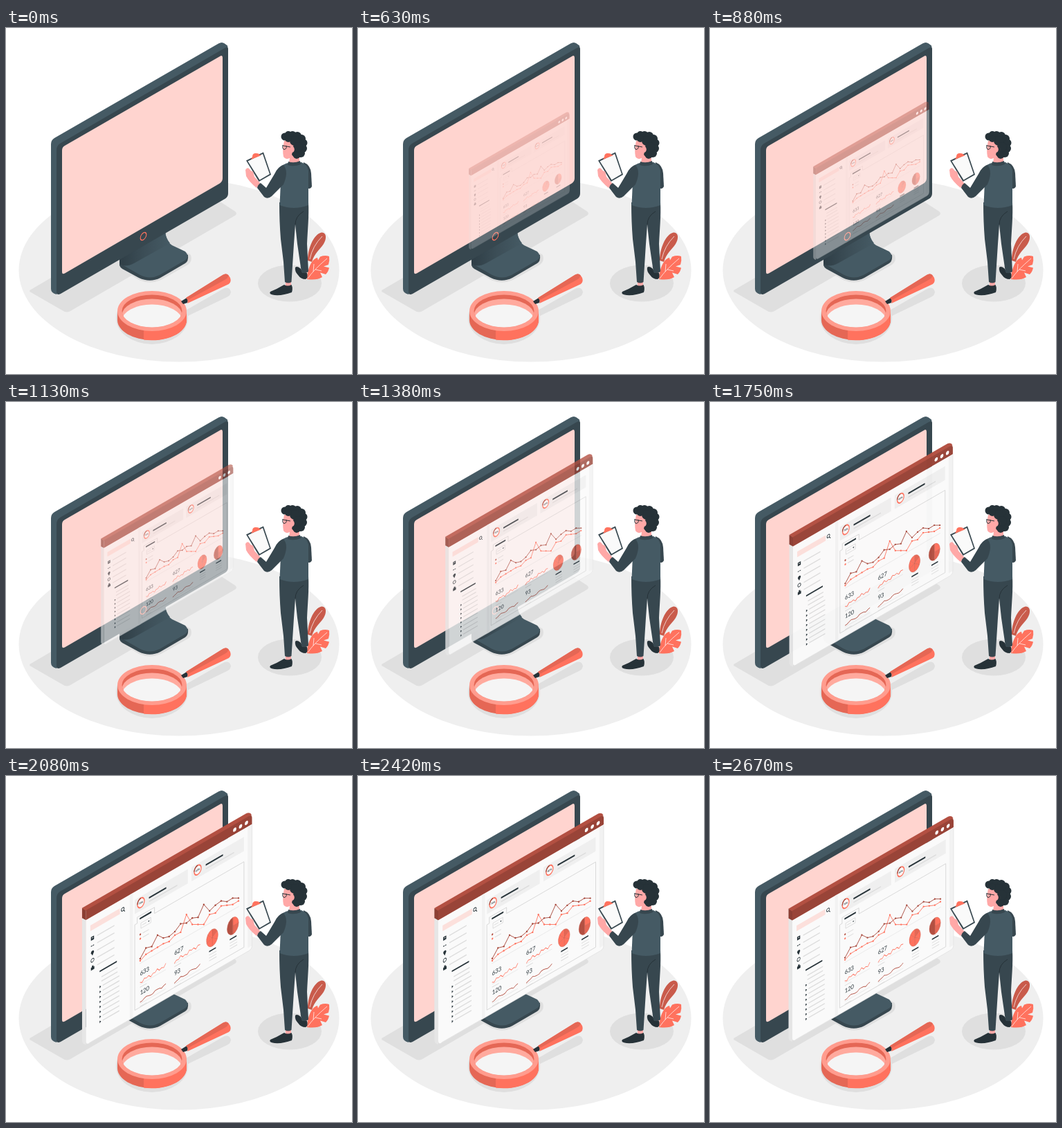
Animation of 500x500 px, one loop 2710 ms. Source, as an HTML page:

```html
<!DOCTYPE html>
<html lang="en">
<head>
<meta charset="utf-8">
<title>Dashboard on a screen</title>
<style>
html, body { margin: 0; width: 100%; height: 100%; overflow: hidden; background: #fff; }
svg { display: block; width: 100vw; height: 100vh; }
text { font-family: Lato, sans-serif; fill: #263238; }
</style>
</head>
<body>
<svg viewBox="0 0 500 500">
  <defs>
    <clipPath id="hole"><ellipse cx="211" cy="409" rx="43.5" ry="23.5"/></clipPath>
    <linearGradient id="neck" x1="0" x2="1"><stop offset="0" stop-color="#2f3e46"/><stop offset=".5" stop-color="#3c4e57"/><stop offset="1" stop-color="#455a64"/></linearGradient>
  </defs>

  <!-- floor and shadows -->
  <ellipse cx="250" cy="350" rx="231.5" ry="132.5" fill="#efefef"/>
  <g fill="#dfdfdf">
    <path d="M36 378L65 361L300 252Q306 249 311 252L331 265Q335 268 331 271L93 409Q88 412 83 409L36 382Q32 380 36 378Z"/>
    <path d="M166 348L192 364Q208 371 224 364L263 342Q270 337 267 328L250 318Z"/>
    <ellipse cx="410" cy="369" rx="46" ry="26.5"/>
    <ellipse cx="211" cy="419" rx="52" ry="38"/>
    <path d="M258 409L312 378Q322 372 325 381Q325 386 319 389L263 416Z"/>
  </g>

  <!-- stand -->
  <path fill="#37474f" d="M164 334V343Q165 346 168 348L192 361Q208 368.500 223 361L259 340Q264 337 263 328L230 312Z"/>
  <path fill="#455a64" d="M166 341L193 356.500Q208 364 222 357L259 335.500Q266 330 259 323L240 314Q231 309 230 294Z"/>
  <path fill="url(#neck)" d="M164 333L230 294Q231 304 237 311L185 340Q174 346 166 342L164 340Z"/>

  <!-- monitor -->
  <path fill="#455a64" d="M65 168Q65 162 70 159L307 22.500Q312 19.500 316 22.500L320 25.500L321 31L73 385Q65 383 65 377Z"/>
  <path fill="#37474f" d="M73 177Q73 170 78 167L316 29Q321 26 321 31V239Q321 244 317 246.500L79 384Q73 387 73 381Z"/>
  <path fill="#ffd4cf" d="M81 177Q81 172 85 170L309 41Q313 38.500 313 43V217Q313 222 309 224.500L85 354.500Q81 357 81 352Z"/>
  <circle r="5" fill="none" stroke="#ff725e" stroke-width="1.300" transform="matrix(.866 -.5 0 1 198.500 301)"/>

  <g id="panel"></g>

  <!-- magnifier -->
  <path fill="#e56755" d="M161 409V422A50 29 0 0 0 261 422V409Z"/>
  <path fill="#ff725e" d="M199 436V450.500A50 29 0 0 0 261 422V409Z"/>
  <ellipse cx="211" cy="409" rx="50" ry="29" fill="#ff9c8e"/>
  <g clip-path="url(#hole)">
    <rect x="160" y="380" width="102" height="60" fill="#e56755"/>
    <ellipse cx="211" cy="415" rx="43.500" ry="23.500" fill="#ffaa9e"/>
    <ellipse cx="211" cy="423" rx="43.500" ry="23.500" fill="#f5f5f5"/>
  </g>
  <path fill="#263238" d="M253 395L261 390Q264 393 262 397L256 399Z"/>
  <path fill="#ff725e" d="M260 390L313 357Q320 353 324 361Q326 367 322 370L262 398Q264 393 260 390Z"/>
  <path fill="#e56755" d="M260 390L313 357Q319 353 322 358Q320 362 316 364L263 393Q262 391 260 390Z"/>

  <!-- plant -->
  <path fill="#c95b4b" d="M436 336C436 320 444 298 456 295.500C463 295 464 304 459 312C453 321 446 325 442 338Z"/>
  <path fill="#ff725e" d="M435 363C436 345 443 333 450 332L451 335.500L454 330.500Q461 328 467 330Q468 336 466 342L459 344.500L467 346.500Q466 352 462 356L454 353.500L457 360Q449 365 435 363Z"/>
  <path fill="none" stroke="#fff" stroke-width=".7" d="M439 334Q443 315 457 301M436 362Q444 350 464 333M444 352L445 341M447 349L456 351"/>

  <!-- person -->
  <g id="person">
    <path fill="#ffa8a7" d="M404 364H412V374H404ZM427 350H435V358H427Z"/>
    <path fill="#263238" d="M382 381Q392 377 402 371Q407 374 412.500 371Q415 376 413 382Q400 387 388 386Q379 385 382 381ZM418 346Q421 343 426 348L429 354L435 354Q437 361 433 363Q426 363 422 357Q417 352 418 346Z"/>
    <path fill="#37474f" d="M395 252H437C438 272 436 290 435 312L437 352Q432 356 427 353L421 312L418 284L416 312L412.500 367Q408 370 403 367L401 338L397 305Q395 280 395 252Z"/>
    <path fill="none" stroke="#263238" d="M418 284Q418 272 430 265"/>
    <path fill="#37474f" d="M430 194Q440 198 441 210L442 229Q440 234 435 231L431 210Z"/>
    <path fill="#455a64" d="M398 199Q405 195 411 194H427Q435 197 437 206L437 256Q416 264 395.500 256Z"/>
    <path fill="#ffa8a7" d="M402 163Q399 177 401 186Q404 191 410 188L409 195H424V163Z"/>
    <path fill="#37474f" d="M408 193Q416 196 425 192L426 197Q416 201 407 198Z"/>
    <path fill="#263238" d="M411 163L416 170L413 183Q419 192 427 185L432 165Z"/>
    <g id="curls" fill="#263238"></g>
    <ellipse cx="413" cy="175.500" rx="3.800" ry="4.700" fill="#ffa8a7"/>
    <path fill="none" stroke="#263238" d="M400 169Q399 175 402 175.500Q406 175 405 170M400 170L411 172"/>
    <path fill="#37474f" d="M347 191.500L372 179.500L383 212L365.500 222Z"/>
    <path fill="#fafafa" d="M349.500 192.500L371 182L381 211L366.500 219.500Z"/>
    <path fill="#ff725e" d="M354 190L356 186Q356 181 361 181Q366 181 366 183L369 184Z"/>
    <path fill="#ffa8a7" d="M346 205Q349 200 352 204Q354 208 357 207L359 215L368 225L362 231Q351 222 347 214Z"/>
    <path fill="#37474f" d="M401 198Q393 200 388 211L376 231L368 224Q364 226 363 231L373 244Q378 248 384 243L401 226Q409 207 401 198Z"/>
  </g>
</svg>
<script>
const $ = id => document.getElementById(id);
const DARK = '#263238', RED = '#ff725e', DEEP = '#994438', GREY = '#dcdcdc';

const line = (x1, x2, y, w = 1.5, color = GREY) =>
  `<path d="M${x1} ${y}H${x2}" stroke="${color}" stroke-width="${w}" fill="none"/>`;
const rect = (x, y, w, h, fill, extra = '') =>
  `<rect x="${x}" y="${y}" width="${w}" height="${h}" fill="${fill}" ${extra}/>`;
const dot = (x, y, r, fill) => `<circle cx="${x}" cy="${y}" r="${r}" fill="${fill}"/>`;
const label = (x, y, size, s, extra = '') => `<text x="${x}" y="${y}" font-size="${size}" ${extra}>${s}</text>`;

function wedge(r, a, b, fill) {
  const p = t => `${r * Math.sin(t * 2 * Math.PI)} ${-r * Math.cos(t * 2 * Math.PI)}`;
  return `<path d="M0 0L${p(a)}A${r} ${r} 0 ${b - a > .5 ? 1 : 0} 1 ${p(b)}Z" fill="${fill}" stroke="#c95b4b" stroke-width=".4"/>`;
}

function card(x, x2, c, pct) {
  return rect(x, 25, x2 - x, 20, '#efefef')
    + `<g transform="translate(${c} 34) scale(.87 1)" fill="none" stroke-width="1.700">`
    + `<circle r="6.500" fill="#fafafa" stroke="${RED}"/><path d="M0 -6.500A6.500 6.500 0 0 0 -6.500 0" stroke="${DEEP}"/></g>`
    + label(c, 35.3, 3.6, pct, 'text-anchor="middle" font-weight="bold"')
    + line(c + 13, c + 41, 33.6, 2.2, DARK) + line(c + 13, c + 59, 39, 1.5);
}

// Points are spread evenly in x; heights are stage coordinates.
function series(ys, color) {
  const pts = ys.map((y, i) => [195 + i * 8.12, y]);
  return `<polyline points="${pts.join(' ')}" fill="none" stroke="${color}" stroke-width=".9"/>`
    + pts.map(p => dot(p[0].toFixed(1), p[1], 1.15, color)).join('');
}

function spark(x, y, seed, color) {
  const n = 12, pts = [];
  for (let i = 0; i <= n; i++)
    pts.push([x + i * 42 / n, y - i * .3 + 2.6 * Math.sin(i * 2.2 + seed) * Math.sin(i * .9 + seed + .6)]);
  return `<polyline points="${pts.join(' ')}" fill="none" stroke="${color}" stroke-width=".9"/>`;
}

function stat(x, y, n, seed, color) {
  return label(x, y, 8.7, n) + spark(x, y + 9, seed, color)
    + line(x, x + 42, y + 12, .5) + line(x, x + 11, y + 16, 1.1);
}

function sidebar() {
  let s = rect(7, 25, 48, 8, '#fce0dc')
    + `<circle cx="59.500" cy="28.500" r="2.300" fill="none" stroke="${DARK}"/><path d="M61 30.500L63 33" stroke="${DARK}"/>`;
  const icons = [
    rect(8, 42, 5, 5, DARK) + rect(9.5, 43.5, 2, 1, '#fff'),
    line(8, 10, 55, 1.2, DARK) + line(11, 13, 55, 1.2, DARK),
    `<path d="M10.500 69L8 64.500A2.500 2.500 0 1 1 13 64.500Z" fill="${DARK}"/>`,
    `<circle cx="10.500" cy="75.500" r="2.500" fill="none" stroke="${DARK}" stroke-width=".9"/>`,
    rect(8, 85, 5.5, 4, DARK) + rect(9.5, 83, 2.5, 2.5, DARK)
  ];
  icons.forEach((icon, i) => s += icon + line(18, 46, 44.5 + i * 10.3));
  s += line(22, 50, 97, 2, DARK) + line(25, 51, 106) + line(25, 51, 112);
  for (let i = 0; i < 8; i++) {
    const y = 119 + i * 7;
    s += `<path d="M22 ${y - 1.8}L24.500 ${y}L22 ${y + 1.8}Z" fill="${DARK}"/>` + line(27, 54, y);
  }
  return s;
}

function chartBox() {
  return `<path d="M79 180V60H83V51.500H111V60H256V180Z" fill="#fafafa" stroke="#d4d4d4" stroke-width=".8"/>`
    + line(87, 106, 55.5, 2.2, DARK)
    + rect(89, 62.5, 16, 7.5, 'none', 'stroke="#cfcfcf" stroke-width=".6"')
    + line(91, 98, 66.2, 1) + `<path d="M100.500 65.500H103L101.700 67.500Z" fill="${DARK}"/>`
    + dot(88, 78, 1.3, '#b35042') + dot(88, 84, 1.3, RED) + line(92, 102, 78, 1.1) + line(92, 102, 84, 1.1)
    + line(87, 248, 118.5, .5);
}

function pies() {
  const r = 11.8, a = 204.5, b = 238;
  const pie = (x, parts) => `<g transform="translate(${x} 141) scale(.79 1)">${parts}</g>`;
  let slices = '';
  [0, .17, .33, .5, .7, .86, 1].forEach((t, i, all) => {
    if (i) slices += wedge(r, all[i - 1], t, i === 1 ? '#e56755' : RED);
  });
  let s = pie(a, slices)
    + pie(b, wedge(r, 0, .25, RED) + wedge(r, .25, .5, '#e56755') + wedge(r, .5, 1, '#b35042'));
  for (const x of [a - 5, b - 5]) {
    s += line(x, x + 11, 158, 1.7, DARK);
    for (let i = 0; i < 3; i++) s += line(x, x + 12, 163 + i * 4, 1);
  }
  return s;
}

function buildPanel() {
  const side = 'M113.500 191L119 194V';
  const front = `<path d="M0 0H265Q269 0 269 5V14H0Z" fill="${DEEP}"/>`
    + '<path d="M0 14H269V184Q269 189 264 189H5Q0 189 0 184Z" fill="#fafafa"/>'
    + rect(71, 14, 5, 175, '#f2f2f2') + rect(262, 14, 7, 170, '#f2f2f2')
    + '<path d="M269 14V184Q269 189 264 189H5" fill="none" stroke="#e3e3e3" stroke-width=".8"/>'
    + [241, 250.5, 260].map(x => dot(x, 7.5, 2.7, '#fff')).join('')
    + sidebar() + card(79, 165, 89, '70%') + card(171, 256, 181, '60%') + chartBox() + pies()
    + stat(87.5, 136, '633', 0, RED) + stat(143, 135, '627', 1.3, RED)
    + stat(87.5, 163, '120', 2.1, '#b35042') + stat(143, 163.5, '93', .7, '#b35042');
  $('panel').innerHTML =
    `<path d="${side}383Q113.500 382 113.500 377Z" fill="#e6e6e6"/>`
    + `<path d="${side}208L113.500 205Z" fill="#8c3e33"/>`
    + '<path d="M113.500 191L344 58Q347 56.500 350 58L351.500 60.500L119 195Z" fill="#b35042"/>'
    + `<g transform="matrix(.866 -.5 0 1 119 194)">${front}</g>`
    + series([265, 256, 251, 246, 241, 238, 229, 225, 200, 214, 214, 214, 200, 198, 188, 187, 186, 181], RED)
    + series([262, 247, 245, 229, 233, 231, 224, 213, 212, 205, 204, 186, 195, 187, 181, 182, 177, 177], '#a8483b');
}

function buildHair() {
  const curls = [[403, 157, 5.5], [408, 154, 5], [414, 155, 6], [421, 156, 6], [427, 160, 6], [430, 166, 5.5],
    [429, 174, 6], [426, 181, 6], [420, 184, 5], [417, 163, 7], [408, 160, 5], [422, 172, 7]];
  $('curls').innerHTML = curls.map(c => dot(...c)).join('');
}

const LOOP = 2710, STEPS = 65;
const curve = (s, a, b) => 3 * (1 - s) ** 2 * s * a + 3 * (1 - s) * s * s * b + s ** 3;

// Cubic easing with overshoot, solved for x by bisection.
function ease(x) {
  if (x >= 1) return 1;
  let lo = 0, hi = 1;
  for (let i = 0; i < 24; i++) {
    const mid = (lo + hi) / 2;
    if (curve(mid, .36, .5) < x) lo = mid; else hi = mid;
  }
  return curve(lo, -.01, 1.38);
}

function draw(t) {
  const step = Math.floor((t + 5) * .024);
  const p = step < 3 ? 0 : ease((step + 1) / STEPS);
  const panel = $('panel');
  panel.setAttribute('opacity', Math.max(0, Math.min(1, p)));
  panel.setAttribute('transform', `translate(233 220.7) scale(${.5 + .5 * p}) translate(-233 -220)`);
}

buildPanel();
buildHair();
const start = performance.now();
function tick() {
  draw((performance.now() - start) % LOOP);
  requestAnimationFrame(tick);
}
draw(0);
requestAnimationFrame(tick);
</script>
</body>
</html>
```
